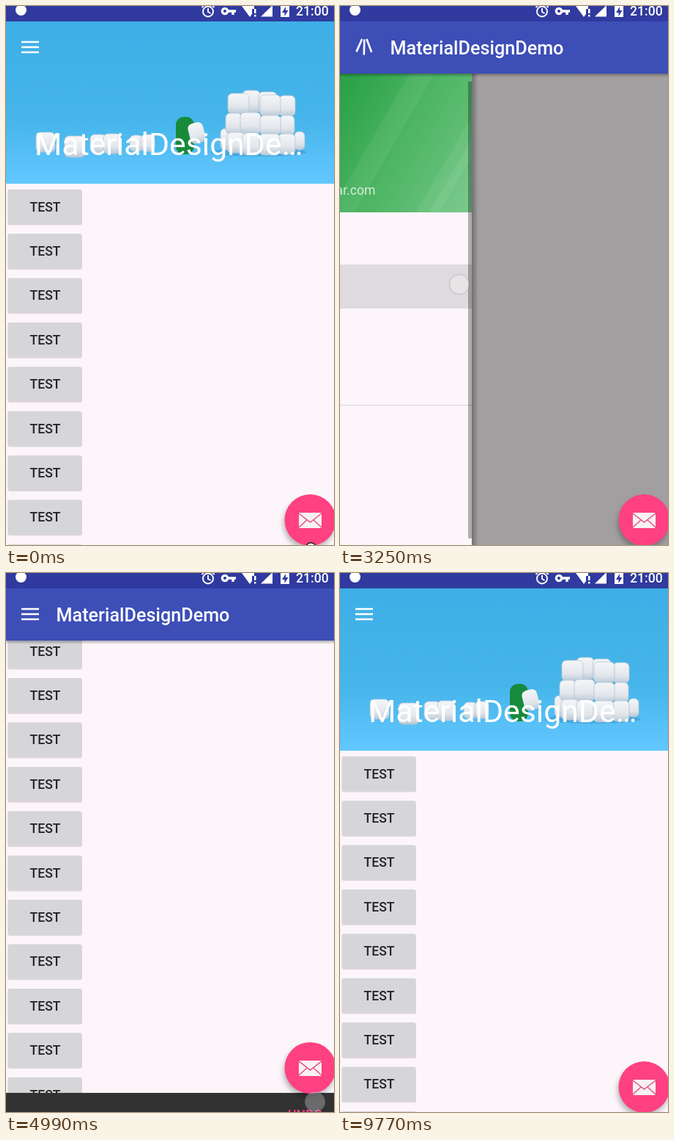
Animation, 448 px wide and 734 px high, one loop 9940 ms. Source, as an HTML page:

```html
<!DOCTYPE html>
<html lang="en">
<head>
<meta charset="utf-8">
<title>Material design demo</title>
<style>
html, body { margin: 0; width: 100%; height: 100%; overflow: hidden; background: #fcf6fa; }
svg { display: block; width: 100vw; height: 100vh; }
text { font-family: Roboto, "Noto Sans", sans-serif; font-size: 17.6px; white-space: pre; }
.medium { font-weight: 500; }
</style>
</head>
<body>
<svg viewBox="0 0 448 734">
  <defs>
    <linearGradient id="sky" x2="0" y2="1">
      <stop offset="0" stop-color="#3eafe6"/><stop offset=".6" stop-color="#45b5ea"/>
      <stop offset=".82" stop-color="#56bff5"/><stop offset="1" stop-color="#62c8ff"/>
    </linearGradient>
    <linearGradient id="puff" x2="0" y2="1">
      <stop offset="0" stop-color="#f5f6f8"/><stop offset=".65" stop-color="#e2e6eb"/>
      <stop offset="1" stop-color="#b9c9d8"/>
    </linearGradient>
    <linearGradient id="leaf" gradientUnits="userSpaceOnUse" x1="0" y1="92" x2="355" y2="297">
      <stop offset="0" stop-color="#1d873b"/><stop offset=".45" stop-color="#2fa34b"/>
      <stop offset=".7" stop-color="#4fb665"/><stop offset="1" stop-color="#72c585"/>
    </linearGradient>
    <linearGradient id="edgeShade">
      <stop offset="0" stop-opacity=".3"/><stop offset="1" stop-opacity="0"/>
    </linearGradient>
    <linearGradient id="barShade" x2="0" y2="1">
      <stop offset="0" stop-opacity=".3"/><stop offset="1" stop-opacity="0"/>
    </linearGradient>
    <filter id="soft" x="-30%" y="-30%" width="160%" height="160%"><feGaussianBlur stdDeviation="3.5"/></filter>
    <clipPath id="headerClip"><rect id="headerWindow" y="21" width="448"/></clipPath>
  </defs>

  <rect width="448" height="734" fill="#fcf6fa"/>
  <g id="buttons"></g>
  <rect id="scrim" y="92" width="448" height="642"/>

  <g id="drawer">
    <rect x="366" y="92" width="9" height="642" fill="url(#edgeShade)"/>
    <rect y="92" width="366" height="642" fill="#fcf6fa"/>
    <rect y="92" width="366" height="189" fill="url(#leaf)"/>
    <g fill="#fff" fill-opacity=".06">
      <path d="M172 281 281 92h34L206 281z"/>
      <path d="M290 281 366 150v131z"/>
      <path d="M308 281 366 181v24L322 281z"/>
    </g>
    <rect x="20" y="139" width="48" height="48" rx="3" fill="#8bc34a"/>
    <text x="13.5" y="233" class="medium" fill="#fff">Quelvar Studio</text>
    <text x="13.5" y="257" fill="#fff" fill-opacity=".75">quelvar.studio@quelvar.com</text>
    <rect id="selection" width="366" height="60" fill="#dedadd"/>
    <g id="items"></g>
    <rect y="543" width="366" height="1.3" fill="#dedadd"/>
    <text x="13.5" y="581" class="medium" fill="#77737a" font-weight="400">Communicate</text>
    <rect x="361" y="103" width="5" height="622" fill-opacity=".3"/>
  </g>

  <g id="header">
    <rect id="headerShadow" width="448" height="5" fill="url(#barShade)"/>
    <g clip-path="url(#headerClip)">
      <g id="photo">
        <rect y="21" width="448" height="221" fill="url(#sky)"/>
        <ellipse cx="345" cy="199" rx="66" ry="6" fill="#2e8fc6" opacity=".45"/>
        <g id="puffs"></g>
        <rect x="232" y="151" width="25" height="51" rx="11" fill="#178a3b"/>
        <rect x="250" y="159" width="21" height="28" rx="7" fill="url(#puff)" transform="rotate(-14 260 173)"/>
      </g>
      <rect id="tint" y="21" width="448" height="221" fill="#3d4eb7"/>
    </g>
    <text id="title" fill="#fff"></text>
    <circle id="ripple" cx="33" cy="56" fill="#fff"/>
    <path id="menuIcon" fill="none" stroke="#fff" stroke-width="2.6"/>
  </g>

  <g id="status" fill="#fff">
    <rect width="448" height="21" fill="#303a9f"/>
    <circle cx="20.500" cy="5.500" r="7.500"/>
    <g fill="none" stroke="#fff" stroke-width="1.9">
      <circle cx="276" cy="7.500" r="7"/>
      <path d="M276 3v5l3.500 2M267.500 2l3-3M284.500 2l-3-3"/>
      <circle cx="299" cy="7" r="3.700" stroke-width="3.200"/>
      <path d="M303 7h11M310 7v5" stroke-width="3.500"/>
    </g>
    <path d="M322 0h17v4h-3v7l-3 4zM339 4h2.500v6H339zM339 12h2.500v2.500H339zM348 14.500 364 -1v15.500zM375 0h12v15h-12z"/>
    <path d="M382 1l-5 8h3.500v5l5-8H382z" fill="#303a9f"/>
    <text x="396" y="13.300" class="medium" font-size="18">21:00</text>
  </g>

  <g id="snackbar">
    <rect y="734" width="448" height="62" fill="#323232"/>
    <text x="385" y="770" class="medium" fill="#ff4081">UNDO</text>
  </g>

  <g id="fab">
    <circle cx="414" cy="705" r="35" fill-opacity=".28" filter="url(#soft)"/>
    <circle cx="415.500" cy="700" r="35" fill="#ff4081"/>
    <rect x="400" y="690" width="31" height="21" rx="1.500" fill="#f7f1f4"/>
    <path d="M400 691l15.500 12L431 691M400 710l11-10M431 710l-11-10" fill="none" stroke="#e2557f" stroke-width="1.500"/>
  </g>

  <g id="toast">
    <rect x="173" y="600" width="103" height="55" rx="27.500" fill="#666467"/>
    <text x="224.500" y="634.500" text-anchor="middle" fill="#f0eef0">undo</text>
  </g>

  <circle id="cursor" cx="416.500" cy="738" r="7" fill="#fff" stroke="#222" stroke-width="1.500"/>
  <circle id="touch" r="13.500" fill="#fff" fill-opacity=".28" stroke="#8085b8" stroke-opacity=".25" stroke-width="1.500"/>
</svg>

<script>
const LOOP = 9940, DRAWER = 366, COLLAPSE = 150, SCROLL = 167, ROW = 60.4;
const el = id => document.getElementById(id);
const set = (id, attrs) => { for (const k in attrs) el(id).setAttribute(k, attrs[k]); };
const lerp = (a, b, p) => a + (b - a) * p;
const ramp = (t, from, to) => Math.min(1, Math.max(0, (t - from) / (to - from)));
const smooth = p => p * p * (3 - 2 * p);
const easeOut = p => 1 - (1 - p) ** 2;
const pulse = (t, from, to, fade = 70) => Math.min(ramp(t, from, from + fade), 1 - ramp(t, to - fade, to));

// Scrolling list of buttons
el('buttons').innerHTML = Array.from({ length: 14 }, (_, i) => `
  <g transform="translate(0 ${(i * ROW).toFixed(1)})">
    <rect x="2.500" y="251" width="101.500" height="47.500" rx="3" fill-opacity=".13"/>
    <rect x="2.500" y="249.700" width="101" height="46.500" rx="2.500" fill="#d6d5d8"/>
    <text x="53.500" y="279.500" text-anchor="middle" class="medium" fill="#252427">TEST</text>
  </g>`).join('');

// Marshmallows: scattered pieces, then the pile from back to front
const puffs = [
  [41, 172, 26, 27], [80, 177, 28, 29], [115, 175, 22, 25], [133, 174, 24, 27], [169, 176, 18, 22], [184, 175, 19, 23],
  [293, 167, 14, 29], [394, 171, 14, 25], [323, 115, 24, 30], [345, 117, 25, 30],
  [303, 119, 29, 28], [373, 122, 22, 28], [347, 121, 28, 29],
  [300, 146, 22, 28], [374, 149, 20, 27], [320, 145, 28, 29], [347, 149, 28, 27],
  [302, 172, 24, 28], [372, 174, 23, 28], [323, 173, 24, 30], [346, 174, 28, 29]
];
el('puffs').innerHTML = puffs.map(([x, y, w, h]) =>
  `<rect x="${x}" y="${y}" width="${w}" height="${h}" rx="6" fill="url(#puff)" stroke="#b4c4d2" stroke-width=".8"/>`).join('');

const items = [
  ['Import', 322, 'M9 2 7.200 4H4Q2 4 2 6V18Q2 20 4 20H20Q22 20 22 18V6Q22 4 20 4H16.800L15 2zM12 7a5 5 0 0 1 0 10a5 5 0 0 1 0-10zM12 8.800a3.200 3.200 0 0 0 0 6.400a3.200 3.200 0 0 0 0-6.400z'],
  ['Gallery', 382.5, 'M8 2H20Q22 2 22 4V16Q22 18 20 18H8Q6 18 6 16V4Q6 2 8 2zM11 12 8 16H20L16 11 13 14.700zM2 6H4V20H18V22H4Q2 22 2 20z'],
  ['Slideshow', 443, 'M8 2H20Q22 2 22 4V16Q22 18 20 18H8Q6 18 6 16V4Q6 2 8 2zM12 5.500V14.500L18 10zM2 6H4V20H18V22H4Q2 22 2 20z'],
  ['Tools', 503, 'M22.700 19 13.600 9.900C14.500 7.600 14 4.900 12.100 3 10.100 1 7.100.6 4.700 1.700L9 6 6 9 1.600 4.700C.4 7.100.9 10.100 2.900 12.100 4.800 14 7.500 14.500 9.800 13.600L18.900 22.700Q19.600 23.300 20.300 22.700L22.600 20.400Q23.300 19.700 22.700 19z'],
  ['Share', 635, 'M18 2a3 3 0 0 1 0 6a3 3 0 0 1 0-6zM6 9a3 3 0 0 1 0 6a3 3 0 0 1 0-6zM18 16a3 3 0 0 1 0 6a3 3 0 0 1 0-6zM6 11 17 4.500 18 6 8 12 18 18 17 19.500 6 13z'],
  ['Send', 695.5, 'M2 21 23 12 2 3V10L17 12 2 14z']
];
el('items').innerHTML = items.map(([label, y, d]) => `
  <g id="item${label}">
    <path d="${d}" fill-rule="${label === 'Share' ? 'nonzero' : 'evenodd'}" transform="translate(13.500 ${y - 15}) scale(1.260)"/>
    <text x="84" y="${y + 6.3}" class="medium">${label}</text>
  </g>`).join('');

function select(name, y) {
  set('selection', { y });
  for (const [label] of items) {
    const [icon, text] = el('item' + label).children;
    icon.setAttribute('fill', label === name ? '#3d4eb7' : '#757277');
    text.setAttribute('fill', label === name ? '#3d4eb7' : '#232225');
  }
}

const drawerAt = t =>
  easeOut(ramp(t, 2200, 2650)) - easeOut(ramp(t, 3130, 3535)) +
  easeOut(ramp(t, 3600, 3990)) - easeOut(ramp(t, 4250, 4620));

// Three bars that turn into a back arrow
function drawMenuIcon(p, closing) {
  const head = lerp(24, 14, p), shaft = lerp(24, 20, p);
  const angle = p * Math.PI / 4, gap = lerp(7, -0.8, p), x = -shaft / 2;
  const w = head * Math.cos(angle), h = head * Math.sin(angle);
  const cut = 1.2 * p;
  const turn = p > 0 ? (closing ? 180 : -180) * (1 - p) : 0;
  set('menuIcon', {
    d: `M${x + cut} 0h${shaft - 2 * cut}M${x} ${gap}l${w} ${h}M${x} ${-gap}l${w} ${-h}`,
    transform: `translate(33 56) rotate(${turn})`
  });
}

// x, y, start, end, vertical travel
const touches = [
  [300, 640, 980, 1400, -180],
  [46, 62, 2080, 2380, 0],
  [163, 379, 3110, 3330, 0],
  [42, 60, 3560, 3740, 0],
  [42, 60, 4210, 4360, 0],
  [422, 720, 4760, 5080, 0],
  [410, 700, 5220, 5600, 0],
  [287, 500, 5930, 6420, 171]
];

function drawTouch(t) {
  const hit = touches.find(([, , from, to]) => t >= from && t < to);
  if (!hit) return set('touch', { opacity: 0 });
  const [x, y, from, to, dy] = hit;
  set('touch', { cx: x, cy: y + dy * smooth(ramp(t, from, to - 60)), opacity: pulse(t, from, to) });
}

function drawHeader(t) {
  const scroll = SCROLL * (smooth(ramp(t, 1000, 1620)) - smooth(ramp(t, 5950, 6370)));
  const p = Math.min(1, scroll / COLLAPSE), bottom = 242 - p * COLLAPSE;
  const tint = smooth(ramp(t, 1330, 1930)) - smooth(ramp(t, 6230, 6850));
  set('buttons', { transform: `translate(0 ${-scroll})` });
  set('headerWindow', { height: bottom - 21 });
  set('headerShadow', { y: bottom, opacity: p });
  set('photo', { transform: `translate(0 ${-p * COLLAPSE * 0.4})` });
  set('tint', { opacity: tint });
  const small = p > 0.99;
  set('title', {
    x: lerp(39, 68.5, p), y: lerp(202.5, 65.5, p),
    style: `font-size:${lerp(42.8, 25.2, p)}px;font-weight:${small ? 500 : 400}`
  });
  el('title').textContent = small ? 'MaterialDesignDemo' : 'MaterialDesignDe…';
}

function draw(t) {
  drawHeader(t);

  const open = drawerAt(t);
  const closing = (t > 3130 && t < 3560) || t > 4250;
  set('drawer', {
    transform: `translate(${(open - 1) * DRAWER} 0)`,
    visibility: open > 0.001 ? 'visible' : 'hidden'
  });
  set('scrim', { opacity: 0.6 * drawerAt(t - 28) });
  drawMenuIcon(open < 0.001 ? 0 : open, closing);
  if (t < 3130) select('Tools', 473); else select('Gallery', 352);

  const rippleStart = [2100, 3600, 4230].find(s => t >= s && t < s + 520);
  const r = rippleStart === undefined ? 0 : ramp(t, rippleStart, rippleStart + 520);
  set('ripple', { r: lerp(10, 25, easeOut(r)), opacity: r ? 0.12 * Math.min(1, (1 - r) * 3) : 0 });

  const lift = 60 * (smooth(ramp(t, 4877, 5127)) - smooth(ramp(t, 5600, 5850)));
  for (const id of ['snackbar', 'fab']) set(id, { transform: `translate(0 ${-lift})` });

  set('toast', { opacity: pulse(t, 5640, 7960, 250) });
  set('cursor', { opacity: 1 - ramp(t, 60, 140) });
  drawTouch(t);
}

const begin = performance.now();
function tick() {
  draw((performance.now() - begin) % LOOP);
  requestAnimationFrame(tick);
}
tick();
</script>
</body>
</html>
```
